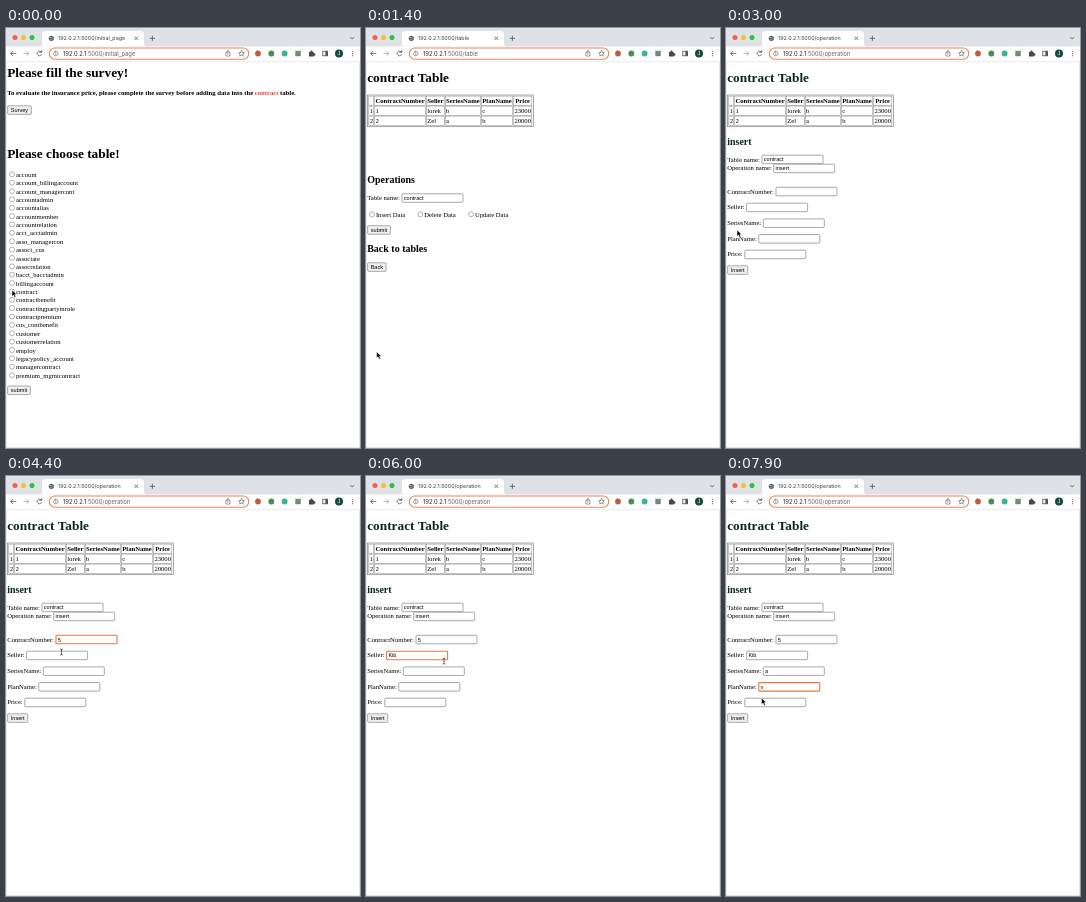
Write an HTML page that moves like this. It is 354 by 420 pixels and loops after 8 s.

```html
<!DOCTYPE html>
<html lang="en">
<head>
<meta charset="utf-8">
<title>Table demo</title>
<style>
  html, body { margin: 0; width: 100%; height: 100%; overflow: hidden; background: #fff; }
  svg { display: block; width: 354px; height: 420px; }
  text { white-space: pre; fill: #000; }
  .serif { font: 6.67px "Liberation Serif", Times, serif; }
  .bold { font-weight: bold; }
  .h1 { font: bold 13.33px "Liberation Serif", Times, serif; }
  .h2 { font: bold 10px "Liberation Serif", Times, serif; }
  .ui { font: 5.55px "Liberation Sans", Arial, sans-serif; }
  .url { font: 5.8px Inter, Roboto, sans-serif; }
  .tab { font: 5.4px Inter, Roboto, sans-serif; }
  .green text.h1, .green text.h2 { fill: #08291d; }
  .icon { fill: none; stroke: #55585c; stroke-width: .8; stroke-linecap: round; stroke-linejoin: round; }
  .cell { fill: none; stroke: #858585; stroke-width: .5; }
</style>
</head>
<body>
<svg id="stage" viewBox="0 0 354 420" xmlns="http://www.w3.org/2000/svg"></svg>
<script>
const LOOP = 8000;
const HOST = "192.0.2.1";
const TABLES = `account account_billingaccount account_managercont accountadmin accountalias
  accountmember accountrelation acct_acctadmin asso_managercon associ_cus associate assocrelation
  bacct_bacctadmin billingaccount contract contractbenefit contractingpartyinrole contractpremium
  cus_contbenefit customer customerrelation employ legacypolicy_account managercontract
  premium_mgmtcontract`.split(/\s+/);

// Page shown from each time on.
const PAGES = [[0, "initial_page"], [1300, "table"], [2800, "operation"]];
const LOADING = [[1000, 1300], [2650, 2800]];
const PRESSED = [[950, 1150], [2600, 2720]];

// Fields of the insert form: label, box x, box y, focus span, typing steps.
const FIELDS = [
  ["ContractNumber:", 50, 159.3, 3700, 4700, [[4000, "5"]]],
  ["Seller:", 20.6, 175.2, 4700, 6300, [[5300, "K"], [5500, "Ki"], [5700, "Kib"]]],
  ["SeriesName:", 37.3, 190.9, 6300, 7000, [[6600, "a"]]],
  ["PlanName:", 32.8, 206.6, 7000, 8000, [[7600, "v"]]],
  ["Price:", 18.8, 222.2, 8000, 8000, []],
];

// Pointer: time, x, y, shape held until the next step.
const POINTER = [
  [0, 6, 262, "arrow"], [400, 6, 262, "arrow"], [900, 11.3, 361, "arrow"],
  [1250, 11.3, 361, "arrow"], [1750, 8, 190, "arrow"], [1950, 5.5, 185.5, "arrow"],
  [2250, 5.5, 185.5, "arrow"], [2400, 9.3, 194, "arrow"], [2550, 11, 202, "arrow"],
  [3000, 11, 202, "arrow"], [3200, 22, 184, "arrow"], [3550, 66, 164, "beam"],
  [4200, 62, 166, "beam"], [4400, 55.5, 176, "beam"], [4600, 52, 180, "beam"],
  [5300, 52, 180, "beam"], [6000, 78, 185, "beam"], [6250, 80, 195, "beam"],
  [6700, 78, 196, "beam"], [6950, 66, 211, "beam"], [7150, 64, 211, "beam"],
  [7500, 35.5, 222, "arrow"], [8000, 35.5, 222, "arrow"],
];

const text = (cls, x, y, str, extra = "") => `<text class="${cls}" x="${x}" y="${y}" ${extra}>${str}</text>`;
const line = (d, extra = "") => `<path class="icon" d="${d}" ${extra}/>`;
const dot = (x, y, r, fill) => `<circle cx="${x}" cy="${y}" r="${r}" fill="${fill}"/>`;
const rect = (x, y, w, h, extra) => `<rect x="${x}" y="${y}" width="${w}" height="${h}" ${extra}/>`;

const button = (x, y, w, label, cls = "") =>
  rect(x, y, w, 8.6, `class="${cls}" rx="1.2" fill="#efefef" stroke="#777" stroke-width=".6"`) +
  text("ui", x + w / 2, y + 6.2, label, 'text-anchor="middle"');

const input = (x, y, value = "") =>
  rect(x, y, 61, 8.5, 'rx=".8" fill="#fff" stroke="#858585" stroke-width=".7"') +
  text("ui", x + 1.8, y + 6.2, value);

const radio = (x, y, label, id = "") =>
  `<circle cx="${x}" cy="${y}" r="2.5" fill="#fff" stroke="#777" stroke-width=".55"/>` +
  (id && `<g id="${id}"><circle cx="${x}" cy="${y}" r="2.4" fill="#e8c9bd" stroke="#4c2d24" stroke-width=".8"/>` +
    dot(x, y, 1.5, "#6b2a1a") + "</g>") +
  text("serif", x + 3.9, y + 2.6, label);

function dataTable() {
  const cols = [["", 3.33], ["ContractNumber", 49.3], ["Seller", 16.3],
    ["SeriesName", 33.7], ["PlanName", 29.6], ["Price", 16.7]];
  const rows = [["1", "1", "lorek", "b", "c", "23000"], ["2", "2", "Zel", "a", "b", "20000"]];
  let out = rect(1.6, 67, 165.8, 31.7, 'class="cell" style="stroke-width:.7"');
  let x = 2.8;
  for (const [i, [head, w]] of cols.entries()) {
    for (let r = 0; r < 3; r++) out += rect(x, 68.1 + r * 10, w + 1.6, 9.4, 'class="cell"');
    out += text("serif bold", x + w / 2 + .8, 75, head, 'text-anchor="middle"');
    rows.forEach((row, r) => out += text("serif", x + .85, 85 + r * 10, row[i]));
    x += w + 2.5;
  }
  return out;
}

function browser() {
  return rect(0, 0, 354, 18.5, 'fill="#dee1e6"') +
    '<path d="M33 18.5q3 0 3-3V6q0-3 3-3h96q3 0 3 3v9.5q0 3 3 3z" fill="#fff"/>' +
    dot(9, 9.5, 2.5, "#f25e57") + dot(17.5, 9.5, 2.5, "#f5bd2f") + dot(26, 9.5, 2.5, "#2bbf43") +
    '<g id="globe">' + dot(45.3, 10.3, 2.6, "#5f6368") +
    '<path d="M43.3 9.5h2l1 1.2M44.5 12l1-1" fill="none" stroke="#fff" stroke-width=".5"/></g>' +
    '<path id="spinner" d="M45.3 7.9a2.4 2.4 0 0 1 2.4 2.4" fill="none" stroke="#8d9299" stroke-width=".8"/>' +
    '<text id="title" class="tab" x="52" y="12.3"></text>' +
    line("M128.9 8.9l2.8 2.8m0-2.8l-2.8 2.8") + line("M144.2 10.3h4.4m-2.2-2.2v4.4") +
    line("M344.5 9.3l1.7 1.8 1.7-1.8") +
    line("M9.8 25.5H4.7m2.2-2.3l-2.3 2.3 2.3 2.3") +
    line("M17.8 25.5h5m-2.2-2.3l2.3 2.3-2.3 2.3", 'style="stroke:#a8abb0"') +
    line("M35.5 24.2a2.4 2.4 0 1 0 .2 2.2m0-3.9v1.9h-1.9", 'id="reload"') +
    line("M31.3 23.3l4.4 4.4m0-4.4l-4.4 4.4", 'id="stop"') +
    rect(43.3, 20, 199.5, 11.2, 'rx="5.6" fill="#fff" stroke="#e08a5c" stroke-width="1.1"') +
    line("M49.8 23.2a2.3 2.3 0 1 0 .01 0M49.8 25.4v1.2M49.8 24.2v.1", 'style="stroke-width:.6"') +
    '<text class="url" x="57" y="27.5" style="fill:#26282b">' + HOST +
    '<tspan id="path" fill="#5f6368"></tspan></text>' +
    line("M220.7 24.5h-.9v3.5h4.2v-3.5h-.9M221.9 26.3v-3.8m-1.1 1l1.1-1.1 1.1 1.1", 'style="stroke-width:.6"') +
    line("M235.5 22.6l.9 1.9 2 .2-1.5 1.4.4 2-1.8-1-1.8 1 .4-2-1.5-1.4 2-.2z", 'style="stroke-width:.6"') +
    dot(252, 25.5, 2.9, "#bd5a41") + dot(265.3, 25.5, 2.9, "#4b8f56") + dot(278.6, 25.5, 3, "#3bb48d") +
    rect(289.3, 22.8, 5.4, 5.4, 'fill="#6f8d70"') +
    '<path d="M303 24h1.5a1.1 1.1 0 1 1 2 0h1.3v1.5a1.1 1.1 0 1 1 0 2V28.5h-4.8z" fill="#45484c"/>' +
    rect(316.8, 23.2, 4.8, 4.6, 'fill="none" stroke="#45484c" stroke-width=".8"') +
    rect(319.4, 23.2, 2.2, 4.6, 'fill="#45484c"') +
    dot(333, 25.5, 4, "#174c39") + text("ui", 333, 27.4, "J", 'text-anchor="middle" style="fill:#fff"') +
    [23.3, 25.5, 27.7].map(y => dot(346.5, y, .65, "#d9482f")).join("") +
    '<path d="M0 33.7h354" stroke="#dcdee1" stroke-width=".6"/>' +
    '<path d="M.2 34v386M353.6 34v386M0 419.6h354" stroke="#d5d7da" stroke-width=".7"/>';
}

const initialPage = () =>
  text("h1", 1.2, 49, "Please fill the survey!") +
  text("serif bold", 1.2, 67.3, 'To evaluate the insurance price, please complete the survey before adding data into the <tspan fill="#e5432a">contract</tspan> table.') +
  button(1.6, 77.8, 23.8, "Survey") +
  text("h1", 1.2, 130, "Please choose table!") +
  TABLES.map((name, i) => radio(6, 146.3 + i * 8.365, name, name === "contract" ? "pickTable" : "")).join("") +
  button(1.6, 358, 22.8, "submit", "press");

const tablePage = () =>
  text("h1", 1.2, 54, "contract Table") + dataTable() +
  text("h2", 1.2, 155.2, "Operations") +
  text("serif", 1.2, 172, "Table name:") + input(36, 165.8, "contract") +
  radio(6, 186.3, "Insert Data", "pickInsert") + radio(54.3, 186.3, "Delete Data") + radio(105, 186.3, "Update Data") +
  button(1.6, 197.7, 22.8, "submit", "press") +
  text("h2", 1.2, 223.6, "Back to tables") + button(1.6, 234.8, 18.5, "Back");

const operationPage = () =>
  text("h1", 1.2, 54, "contract Table") + dataTable() +
  text("h2", 1.2, 116.5, "insert") +
  text("serif", 1.2, 133.5, "Table name:") + input(36, 127.2, "contract") +
  text("serif", 1.2, 142.4, "Operation name:") + input(47.7, 136.2, "insert") +
  FIELDS.map(([label, x, y]) =>
    `<g class="field">${text("serif", 1.2, y + 6.2, label)}${input(x, y)}</g>`).join("") +
  button(1.6, 237.8, 20.2, "Insert");

const stage = document.getElementById("stage");
stage.innerHTML = rect(0, 0, 354, 420, 'fill="#fff"') + browser() +
  `<g id="initial_page">${initialPage()}</g><g id="table">${tablePage()}</g>` +
  `<g id="operation" class="green">${operationPage()}</g>` +
  '<g id="pointer"><path id="arrow" d="M0 0v6.4l1.5-1.4 1.1 2.5 1.3-.6-1.1-2.4h2z" fill="#000" stroke="#fff" stroke-width=".5"/>' +
  '<path id="beam" d="M-1.3-3q1.3 0 1.3.8v4.4q0 .8-1.3.8M1.3-3q-1.3 0-1.3.8M0 2.2q0 .8 1.3.8" fill="none" stroke="#222" stroke-width=".7"/></g>';

const el = id => document.getElementById(id);
const show = (id, on) => el(id).style.display = on ? "" : "none";
const within = (spans, t) => spans.some(([a, b]) => t >= a && t < b);
const latest = (steps, t) => steps.filter(s => s[0] <= t).pop();
const ease = p => p * p * (3 - 2 * p);
const fields = [...document.querySelectorAll(".field")];
const presses = [...document.querySelectorAll(".press")];

function movePointer(t) {
  const i = POINTER.findIndex(p => p[0] > t);
  const [t0, x0, y0, shape] = POINTER[i - 1];
  const [t1, x1, y1] = POINTER[i];
  const p = ease((t - t0) / (t1 - t0));
  el("pointer").setAttribute("transform", `translate(${x0 + (x1 - x0) * p} ${y0 + (y1 - y0) * p})`);
  show("arrow", shape === "arrow");
  show("beam", shape === "beam");
}

function render(t) {
  const page = latest(PAGES, t)[1];
  const loading = within(LOADING, t);
  for (const [, name] of PAGES) show(name, name === page);
  el("title").textContent = `${HOST}:5000/${page}`;
  el("title").style.fill = loading ? "#85898e" : "#3c4043";
  el("path").textContent = `:5000/${page}`;
  show("globe", !loading);
  show("reload", !loading);
  show("spinner", loading);
  show("stop", loading);
  el("spinner").setAttribute("transform", `rotate(${t * .36 % 360} 45.3 10.3)`);
  show("pickTable", t >= 250);
  show("pickInsert", t >= 2000);
  presses.forEach(b => b.setAttribute("fill", within(PRESSED, t) ? "#dcdcdc" : "#efefef"));
  FIELDS.forEach(([, , , from, to, typed], i) => {
    const focus = t >= from && t < to;
    const box = fields[i].querySelector("rect");
    box.setAttribute("stroke", focus ? "#e5793f" : "#858585");
    box.setAttribute("stroke-width", focus ? 1.1 : .7);
    fields[i].lastElementChild.textContent = (latest(typed, t) || [0, ""])[1];
  });
  movePointer(t);
}

const start = performance.now();
function tick() {
  render((performance.now() - start) % LOOP);
  requestAnimationFrame(tick);
}
tick();
</script>
</body>
</html>
```
